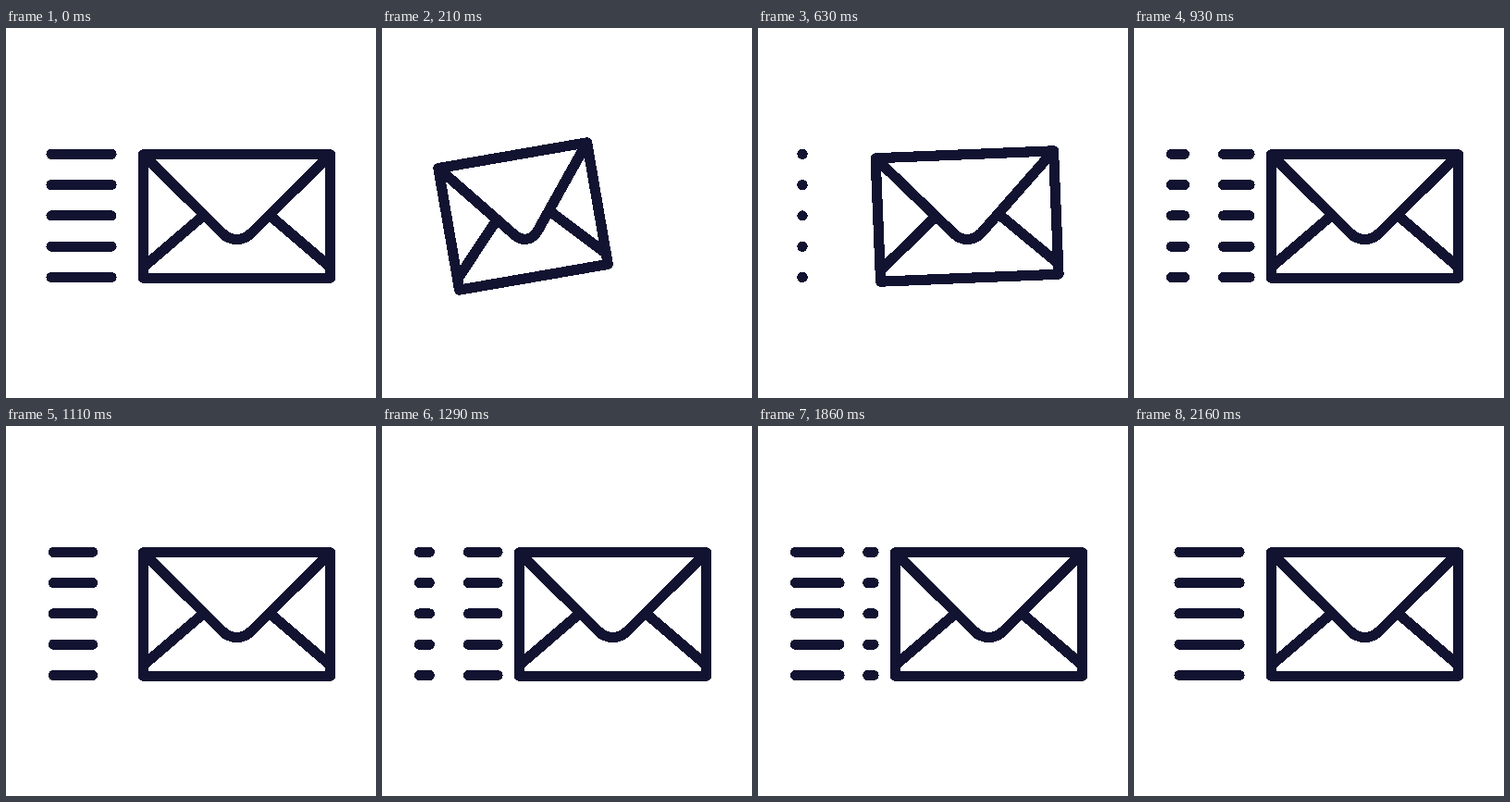
These frames come from a looping animation (400x400 px, 4.19 s). An HTML page:

```html
<!DOCTYPE html>
<html lang="en">
<head>
<meta charset="utf-8">
<title>Sending envelope</title>
<style>
  html, body { margin: 0; width: 100%; height: 100%; overflow: hidden; background: #fff; }
  svg { display: block; width: 100%; height: 100%; shape-rendering: crispEdges; }
  path { fill: none; stroke: #121331; stroke-width: 11.16; stroke-linecap: round; stroke-linejoin: round; }
</style>
</head>
<body>
<svg viewBox="0 0 400 400">
  <path id="lines"/>
  <path id="envelope"/>
</svg>
<script>
const LOOP = 4190, STEP = 30, MOTION_END = 2160;
const RETRACT_END = 180, LAUNCH = 480, REGROW = 615;
const TRACK = { left: 40.5, right: 125, size: 84.5 };
const REST = { left: 49, length: 65 };
const linesPath = document.getElementById('lines');
const envelopePath = document.getElementById('envelope');

// Smoothstep from 0 to 1, beginning at start and lasting duration ms.
function ease(t, start, duration) {
  const u = Math.min(1, Math.max(0, (t - start) / duration));
  return u * u * (3 - 2 * u);
}

// Quick rise that settles softly at 1.
const swing = t => 1 - Math.exp(-Math.pow(Math.max(0, t) / 135, 3.4));

// Pull: 0 at rest, 1 fully drawn to the left.
function drawEnvelope(pull) {
  const angle = -9.9 * pull * Math.PI / 180;
  const cos = Math.cos(angle), sin = Math.sin(angle);
  const stretch = 1 - 0.195 * pull, centre = 249.5 - 98 * pull;
  const at = (x, y) => {
    const sx = x * stretch;
    return `${(centre + sx * cos - y * sin).toFixed(2)} ${(203.5 + sx * sin + y * cos).toFixed(2)} `;
  };
  const W = 101, H = 66.75;
  const frame = 'M' + at(-W, -H) + 'L' + at(W, -H) + at(W, H) + at(-W, H) + 'Z';
  const flap = 'M' + at(-W, -H) + 'L' + at(-16, 18) +
    'C' + at(-7, 27.3) + at(7, 27.3) + at(16, 18) + 'L' + at(W, -H);
  const folds = [-1, 1].map(side => 'M' + at(side * W, 55) + 'L' + at(side * 37.5, 0.5));
  envelopePath.setAttribute('d', frame + flap + folds.join(''));
}

// Visible dash pieces; the running dash wraps around the ends of the track.
function dashes(t) {
  if (t < RETRACT_END) {
    return [[REST.left, REST.left + REST.length * (1 - ease(t, 0, RETRACT_END))]];
  }
  if (t < REGROW) return [];
  const half = TRACK.size / 2;
  const length = half * ease(t, REGROW, 315) + (REST.length - half) * ease(t, 1560, 600);
  const travel = 34 + (REST.left + 3 * TRACK.size - 34) * ease(t, 395, 1707);
  const start = TRACK.left + (travel - TRACK.left) % TRACK.size;
  const end = start + length;
  return end <= TRACK.right
    ? [[start, end]]
    : [[start, TRACK.right], [TRACK.left, end - TRACK.size]];
}

function drawLines(t) {
  let d = '';
  for (const [from, to] of dashes(t)) {
    for (let row = -2; row <= 2; row++) {
      d += `M${from.toFixed(2)} ${202.9 + 33.3 * row}H${to.toFixed(2)}`;
    }
  }
  linesPath.setAttribute('d', d);
}

const began = performance.now();
function tick() {
  const elapsed = (performance.now() - began) % LOOP;
  const t = Math.min(Math.floor(elapsed / STEP) * STEP, MOTION_END);
  drawEnvelope(swing(t) - swing(t - LAUNCH));
  drawLines(t);
  requestAnimationFrame(tick);
}
tick();
</script>
</body>
</html>
```
